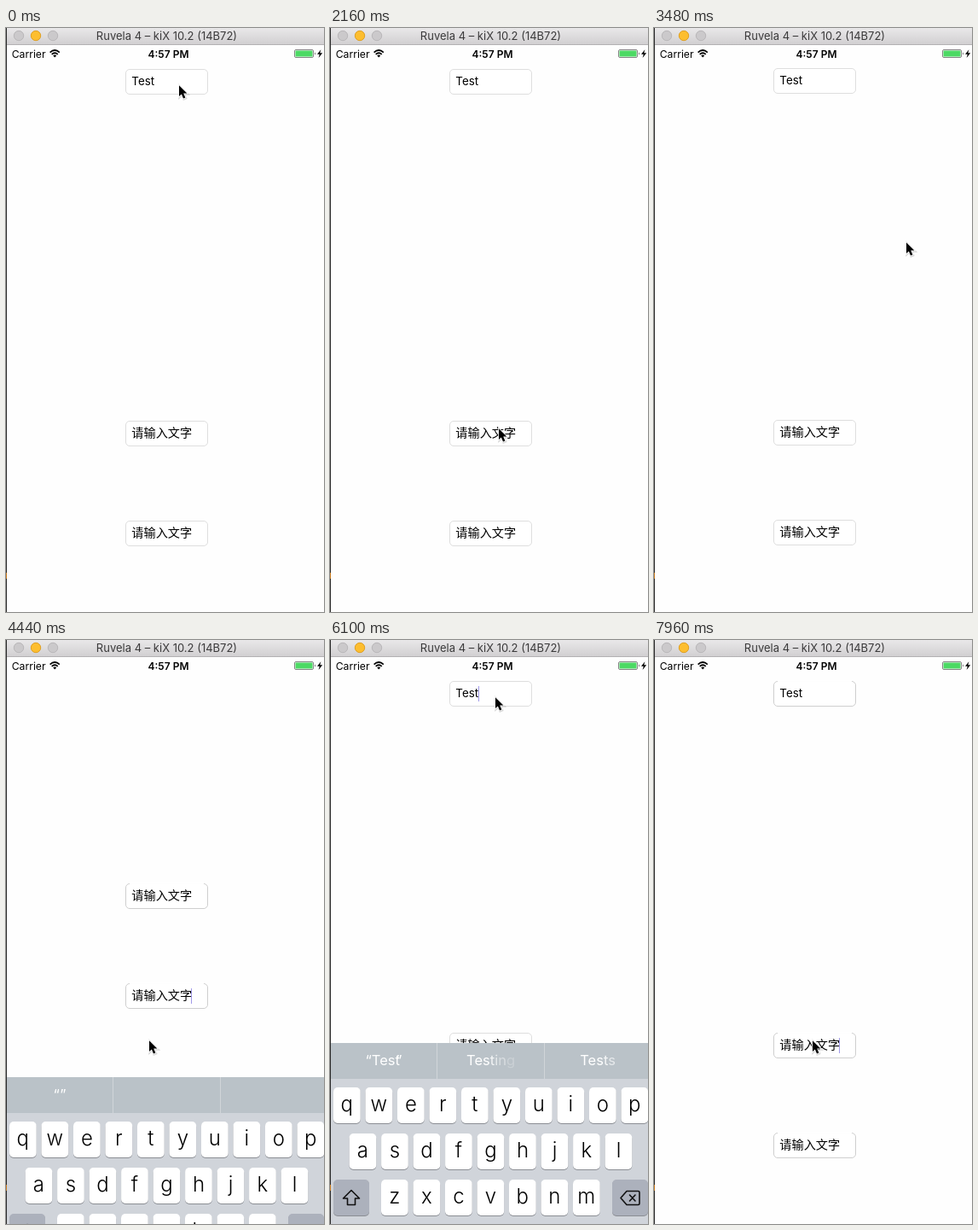
These frames come from a looping animation (373x684 px, 7.99 s). An HTML page:

```html
<!DOCTYPE html>
<html lang="en">
<head>
<meta charset="utf-8">
<title>Keyboard avoidance</title>
<style>
  html, body { margin: 0; width: 100%; height: 100%; overflow: hidden; background: #fefefe; }
  svg { display: block; font-family: Inter, Roboto, sans-serif; }
  .mid { text-anchor: middle; }
  .field { font-size: 13.4px; }
  .cjk { font: 14.2px "Noto Sans CJK SC", "Noto Sans CJK", sans-serif; }
  .box { fill: #fff; stroke: #dedede; }
  .topEdge { display: none; }
  .editing .box { stroke: #cfcfcf; }
  .editing .topEdge { display: inline; }
  .letter { font-size: 24px; font-weight: 360; }
  .label { font-size: 15.2px; }
  .hint { font-size: 16.5px; fill: #fff; }
  .icon { fill: none; stroke: #111; stroke-width: 1.6; stroke-linejoin: round; stroke-linecap: round; }
</style>
</head>
<body>
<svg width="373" height="684" viewBox="0 0 373 684">
  <defs>
    <linearGradient id="chrome" x2="0" y2="1">
      <stop stop-color="#e9e8e9"/><stop offset="1" stop-color="#d1cfd1"/>
    </linearGradient>
    <clipPath id="screen"><path d="M1 20H373V684H1z"/></clipPath>
  </defs>
  <rect width="373" height="684" fill="#fefefe"/>
  <g clip-path="url(#screen)">
    <g id="fields"></g>
    <path id="caret" stroke="#7a6fe0" stroke-opacity=".7" d="M217.5 0v18"/>
  </g>

  <text x="6.7" y="34.5" font-size="12.2">Carrier</text>
  <g fill="none" stroke="#000" stroke-width="1.7">
    <path d="M51.6 28.6Q57.2 23.4 62.8 28.6M53.7 30.9Q57.2 27.6 60.7 30.9"/>
    <path d="M55.2 32.2Q57.2 30.6 59.2 32.2L57.2 34.6z" fill="#000" stroke="none"/>
  </g>
  <text class="mid" x="190.5" y="34.5" font-size="12" font-weight="600">4:57 PM</text>
  <rect x="338.5" y="25.5" width="22" height="9" rx="1.5" fill="#fff" stroke="#666" stroke-width=".8"/>
  <rect x="339.5" y="26.5" width="20" height="7" rx=".5" fill="#4cd964"/>
  <path d="M362 28.2q1.6 1.8 0 3.6z" fill="#222"/>
  <path d="M369.4 25.2L365 30.8H367.8L366.6 35L371.2 29.2H368.3z"/>

  <g id="keyboard">
    <rect y="42" width="373" height="220" fill="#d0d4da"/>
    <rect width="373" height="42" fill="#bac2c8"/>
    <path d="M125.5 0V42M251.5 0V42" stroke="#d0d5d9"/>
    <g id="hints"></g>
    <g id="keys"></g>
    <path class="icon" d="M25 172.5L15.5 182H20.5V189.5H29.5V182H34.5z"/>
    <path class="icon" d="M341 181.5L348 173.5H361.5Q363 173.5 363 175V188Q363 189.5 361.5 189.5H348zM351.5 178L358 185M358 178L351.5 185"/>
    <g class="icon" stroke-width="1.3">
      <circle cx="71" cy="233" r="9.3"/>
      <path d="M65 235H77Q76 240 71 240T65 235z"/>
      <path d="M68 229v1.4M74 229v1.4" stroke-width="2.2"/>
      <rect x="110" y="223" width="6.4" height="12.5" rx="3.2"/>
      <path d="M107.3 231V233Q107.5 238.3 113.2 238.5T119 233V231M113.2 238.5V242.5M109.8 242.5H116.6"/>
    </g>
  </g>

  <rect width="373" height="19.5" fill="url(#chrome)"/>
  <path d="M0 19.5H373" stroke="#b3b1b3"/>
  <g stroke="#b9b7b9" fill="#cbc9cb">
    <circle cx="15" cy="9" r="5.7"/><circle cx="55" cy="9" r="5.7"/>
    <circle cx="35" cy="9" r="5.7" fill="#fdbe2f" stroke="#dfa023"/>
  </g>
  <text class="mid" x="188.5" y="14" font-size="13" fill="#3b3a3b">Ruvela 4 – kiX 10.2 (14B72)</text>
  <path d="M.5 0V684" stroke="#2b2b2b"/>
  <path d="M.5 638V645" stroke="#c87a1e"/>

  <g id="cursor">
    <g transform="translate(0 .4) scale(.9)">
      <path d="M0 1V15.2L3.2 12.2L5.6 17.8L8.2 16.7L5.8 11.2H10.4z" transform="translate(.6 1)" fill="none" stroke="#000" stroke-opacity=".15" stroke-width="3"/>
      <path d="M0 1V15.2L3.2 12.2L5.6 17.8L8.2 16.7L5.8 11.2H10.4z" stroke="#fff" stroke-width="1.8" paint-order="stroke"/>
    </g>
  </g>
</svg>
<script>
const LOOP = 7990, RISE = 258, HIDDEN_Y = 687;
const $ = id => document.getElementById(id);
const clamp = v => Math.max(0, Math.min(1, v));

const fieldTops = [48, 460, 577];
$('fields').innerHTML = fieldTops.map((y, i) => `
  <rect class="box" x="140.5" y="${y + .5}" width="96" height="29" rx="4.5"/>
  <path class="topEdge" d="M145 ${y + .5}H232" stroke="#fefefe" stroke-width="1.4"/>
  <text class="${i ? 'cjk' : 'field'}" x="147.3" y="${y + (i ? 19.4 : 19)}">${i ? '请输入文字' : 'Test'}</text>`).join('');

function key(x, y, width, label, style = 'letter', fill = '#fff') {
  const baseline = y + (style == 'letter' ? 27.5 : 26.3);
  return `<rect x="${x}" y="${y + 1}" width="${width}" height="42" rx="5" fill="#8b8e94"/>
    <rect x="${x}" y="${y}" width="${width}" height="42" rx="5" fill="${fill}"/>
    <text class="mid ${style}" x="${x + width / 2}" y="${baseline}">${label}</text>`;
}
const letterRow = (letters, x, y) => [...letters].map((c, i) => key(x + i * 37.5, y, 31.7, c)).join('');
const special = (x, y, width, label = '') => key(x, y, width, label, 'label', '#acb1bc');
$('keys').innerHTML =
  letterRow('qwertyuiop', 4, 52) + letterRow('asdfghjkl', 22.6, 106) + letterRow('zxcvbnm', 60, 160) +
  special(4, 160, 42) + special(331, 160, 42) +
  special(4, 212, 41, '123') + special(51, 212, 40.5) + key(97.5, 212, 31.5, '') +
  key(135, 212, 145, 'space', 'label') + special(286, 212, 87, 'return');

// shown from, spring start, keyboard up, focused field, hints
const blank = ['“”', '', ''];
const tests = ['“Test”', 'Tests', 'Testing'];
const testing = ['“Test”', 'Testing', 'Tests'];
const phases = [
  [0, -900, 0, 0, tests],
  [240, 80, 1, 0, tests], [1140, 890, 0, 0, tests],
  [2265, 2265, 1, 1, blank], [3300, 3054, 0, 1, blank],
  [4313, 4313, 1, 2, blank], [5320, 5049, 0, 2, blank],
  [5923, 5923, 1, 0, testing], [7000, 6754, 0, 0, testing],
  [7870, LOOP, 1, 1, blank]
];

// time, x, y
const pointer = [
  [0, 203, 66], [770, 203, 66], [960, 194, 198], [1400, 194, 198], [1900, 198, 468],
  [2550, 198, 468], [2730, 262, 254], [2780, 262, 254], [3150, 303, 232], [3400, 303, 232],
  [4000, 172, 586], [4280, 172, 586], [4440, 168, 468], [4950, 73, 208], [5060, 73, 208],
  [5140, 81, 208], [5319, 81, 208], [5320, 94, 208], [5400, 94, 208], [5850, 194, 66],
  [6350, 194, 66], [6800, 121, 197], [7250, 121, 197], [7500, 176, 570], [7700, 186, 468],
  [LOOP, 186, 468]
];

function pointerAt(t) {
  const i = pointer.findIndex(p => p[0] > t);
  const [t0, x0, y0] = pointer[i - 1], [t1, x1, y1] = pointer[i];
  const u = (t - t0) / (t1 - t0), e = u * u * (3 - 2 * u);
  return [x0 + (x1 - x0) * e, y0 + (y1 - y0) * e].map(Math.round);
}

// critically damped spring
function spring(ms) {
  const x = Math.max(0, ms) * .01826;
  return 1 - Math.exp(-x) * (1 + x);
}

// letters fade in one after another while the closing quote slides out
function hintText(word, slot, sec) {
  const letters = [...word].map((c, i) => {
    const slide = c == '”' ? (word.length == 2 ? 7 : 0) + Math.min(0, (sec - .34) * 30) : 0;
    const alpha = slot ? clamp(sec * 8.1 - i * .2) : clamp(sec * 10);
    return `<tspan dx="${slide}" fill-opacity="${alpha}">${c}</tspan>`;
  });
  return `<text class="mid hint" x="${[63, 188.5, 314][slot]}" y="25.5">${letters.join('')}</text>`;
}

function draw() {
  const t = performance.now() % LOOP;
  const [shown, start, up, focus, words] = phases.findLast(p => p[0] <= t);
  const s = spring(t - start), raised = Math.round(RISE * (up ? s : 1 - s));
  const lift = focus ? raised : 0;

  $('keyboard').setAttribute('transform', `translate(0 ${HIDDEN_Y - raised})`);
  $('fields').setAttribute('transform', `translate(0 ${-lift})`);
  $('fields').setAttribute('class', up && focus ? 'editing' : '');
  $('hints').innerHTML = words.map((w, i) => hintText(w, i, up ? (t - start) / 1000 : 1)).join('');

  const caretOn = up && (t - shown) % 1040 < 530;
  $('caret').style.display = caretOn ? '' : 'none';
  $('caret').setAttribute('transform', `translate(${focus ? 0 : -43} ${fieldTops[focus] + 6 - lift})`);
  $('cursor').setAttribute('transform', `translate(${pointerAt(t).join(' ')})`);
  requestAnimationFrame(draw);
}
draw();
</script>
</body>
</html>
```
